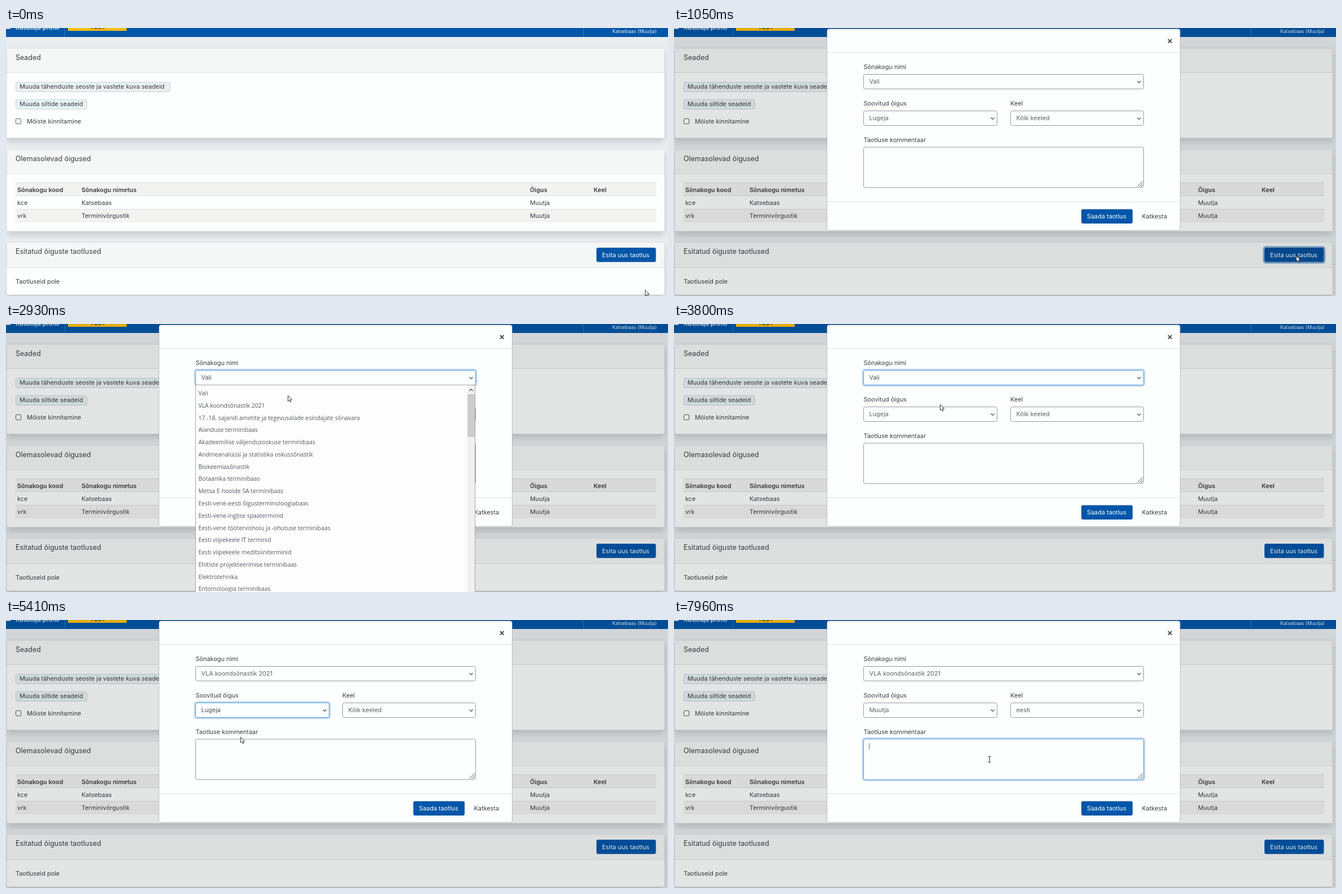
An HTML page with a canvas for the animation above (8000 ms loop, 1175x477 px).

```html
<!DOCTYPE html>
<html lang="et">
<head>
<meta charset="utf-8">
<title>Õiguse taotlemine</title>
<style>
html, body { margin: 0; width: 100%; height: 100%; overflow: hidden; background: #e9edf0; }
canvas { display: block; }
</style>
</head>
<body>
<canvas id="stage" width="1175" height="477"></canvas>
<script>
const ctx = document.getElementById('stage').getContext('2d');
const W = 1175, H = 477, LOOP = 8000;
const UI = 'Inter, sans-serif', MENU = '"Open Sans", sans-serif';
const INK = '#3b3e43', BLUE = '#0056a8', LINE = '#dfe3e5';
const ROW = 21.78;

const DICTS = ['Vali', 'VLA koondsõnastik 2021',
  '17.-18. sajandi ametite ja tegevusalade esindajate sõnavara',
  'Aianduse terminibaas', 'Akadeemilise väljendusoskuse terminibaas',
  'Andmeanalüüsi ja statistika oskussõnastik', 'Biokeemiasõnastik',
  'Botaanika terminibaas', 'Metsa E-hoolde SA terminibaas',
  'Eesti-vene-eesti õigusterminoloogiabaas', 'Eesti-vene-inglise spaaterminid',
  'Eesti-vene töötervishoiu ja -ohutuse terminibaas', 'Eesti viipekeele IT terminid',
  'Eesti viipekeele meditsiiniterminid', 'Ehitiste projekteerimise terminibaas',
  'Elektrotehnika', 'Entomoloogia terminibaas'];
const RIGHTS = ['Lugeja', 'Muutja'];
const LANGS = ['Kõik keeled', 'eesti', 'hollandi', 'hispaania', 'inglise', 'itaalia', 'kreeka',
  'ladina', 'läti', 'poola', 'portugali', 'prantsuse', 'rootsi', 'saksa'];

// Pointer moves: first step, last step, number of steps, end point
const MOVES = [
  [60, 130, 2, 1124, 451], [470, 720, 5, 1104, 405], [1460, 1600, 3, 785, 178],
  [1860, 2130, 5, 563, 98], [2790, 2930, 3, 500, 127], [3000, 3400, 7, 472, 143],
  [3920, 4260, 6, 430, 157], [4650, 4990, 6, 416, 208], [5480, 6080, 10, 638, 164],
  [6610, 6610, 1, 639, 178], [6680, 6820, 3, 641, 205], [7550, 7820, 4, 560, 248]];

function pointer(t) {
  let x = 1134, y = 466;
  for (const [a, b, n, px, py] of MOVES) {
    if (t < a) break;
    const step = b > a ? Math.floor((t - a) / (b - a) * (n - 1) + 1e-6) + 1 : n;
    const f = Math.min(step / n, 1);
    x += (px - x) * f;
    y += (py - y) * f;
  }
  return [x, y];
}

function text(s, x, cy, { size = 10.9, color = INK, weight = 400, font = UI } = {}) {
  ctx.font = `${weight} ${size}px ${font}`;
  ctx.fillStyle = color;
  ctx.fillText(s, x, Math.round(cy + size * 0.36));
}

function rect(x, y, w, h, color) {
  ctx.fillStyle = color;
  ctx.fillRect(x, y, w, h);
}

function box(x, y, w, h, r, fill, stroke) {
  ctx.beginPath();
  ctx.roundRect(x, y, w, h, r);
  if (fill) { ctx.fillStyle = fill; ctx.fill(); }
  if (stroke) { ctx.strokeStyle = stroke; ctx.lineWidth = 1; ctx.stroke(); }
}

function path(points, color, width) {
  ctx.beginPath();
  points.forEach(([x, y]) => ctx.lineTo(x, y));
  ctx.strokeStyle = color;
  ctx.lineWidth = width;
  ctx.stroke();
}

function ring(x, y, w, h, alpha) {
  ctx.beginPath();
  ctx.roundRect(x - 1.5, y - 1.5, w + 3, h + 3, 4);
  ctx.strokeStyle = `rgba(0, 86, 168, ${alpha})`;
  ctx.lineWidth = 2.4;
  ctx.stroke();
}

function chevron(x, y, dir = 1) {
  path([[x - 3, y - 1.6 * dir], [x, y + 1.6 * dir], [x + 3, y - 1.6 * dir]], '#44474c', 1.3);
}

function panel(y, bottom, split, title) {
  ctx.save();
  ctx.shadowColor = 'rgba(0, 0, 0, .15)';
  ctx.shadowBlur = 12;
  ctx.shadowOffsetY = 6;
  box(1, y, 1168, bottom - y, 3, '#fdfefe');
  ctx.restore();
  box(1, y, 1168, split - y, [3, 3, 0, 0], '#f5f7f7');
  rect(1, split, 1168, 1, LINE);
  box(1.5, y + .5, 1167, bottom - y - 1, 3, null, 'rgba(0, 0, 0, .08)');
  text(title, 17, y + 16.8, { size: 12.45 });
}

function page(t) {
  rect(0, 0, W, H, '#e9edf0');
  rect(0, 0, W, 16, BLUE);
  rect(0, 0, 8, 1.5, '#fff');
  text('Kasutaja profiil', 17, -1, { color: '#fff', weight: 500 });
  rect(104, 0, 1, 16, '#3077b9');
  rect(1024, 0, 1, 16, '#3077b9');
  rect(110, 0, 104, 5, '#fdbf0f');
  text('TEST', 149, -1.5, { weight: 600 });
  text('Katsebaas (Muutja)', 1076, 6, { size: 8.6, color: '#e6eef6' });

  panel(36, 196, 79, 'Seaded');
  box(17.5, 96.5, 274, 17, 2.5, '#e9f0f2', '#c9d8dd');
  text('Muuda tähenduste seoste ja vastete kuva seadeid', 24, 104.5);
  box(17.5, 127.5, 126, 17, 2.5, '#e9f0f2', '#c9d8dd');
  text('Muuda siltide seadeid', 24, 135.5);
  box(17.5, 161.5, 9, 9, 1, '#fff', '#55575f');
  text('Mõiste kinnitamine', 37, 166);

  panel(216, 362, 259, 'Olemasolevad õigused');
  rect(17, 275, 1137, 24, '#f2f2f1');
  rect(17, 323, 1137, 23, '#f2f2f1');
  [275, 298, 322].forEach(y => rect(17, y, 1137, 1, '#dbdfe2'));
  const cols = [20, 134, 930, 1043];
  [['Sõnakogu kood', 'Sõnakogu nimetus', 'Õigus', 'Keel'],
   ['kce', 'Katsebaas', 'Muutja'],
   ['vrk', 'Terminivõrgustik', 'Muutja']].forEach((row, i) =>
    row.forEach((s, j) => text(s, cols[j], 287.8 + i * 23.3, { weight: i ? 400 : 600 })));

  panel(381, 475, 426, 'Esitatud õiguste taotlused');
  text('Taotluseid pole', 17, 451);
  const hover = t >= 720 && t < 1530, focus = t >= 990 && t < 2390;
  box(1048, 391, 105.5, 25.5, 3, hover ? '#004f9b' : BLUE);
  if (focus) ring(1048, 391, 105.5, 25.5, .5);
  text('Esita uus taotlus', 1058, 404, { color: '#fff' });
}

function field(x, y, w, h, focus, value) {
  if (focus) ring(x, y, w, h, .26);
  box(x, y, w, h, 3, '#fdfefe', focus ? '#52a6ee' : '#949ba5');
  if (value) {
    text(value, x + 10, y + 13, { color: focus ? '#495057' : '#5d646d' });
    chevron(x + w - 8, y + 13.5);
  }
}

function menu(x, y, w, h, items, active, thumb) {
  rect(x, y, w, h, '#fdfdfe');
  ctx.strokeStyle = '#a3a6ad';
  ctx.lineWidth = 1;
  ctx.strokeRect(x + .5, y + .5, w - 1, h);
  const inner = thumb ? w - 14 : w - 2;
  items.forEach((s, i) => {
    const top = Math.round(y + 3.6 + i * ROW);
    if (i === active) rect(x + 1, top, inner - 1, 22, '#e0dfe6');
    text(s, x + 5.5, y + 15.2 + i * ROW,
      { size: 10.4, font: MENU, color: i === active ? '#28223c' : '#555963' });
  });
  if (thumb) {
    rect(x + inner, y + 1, 13, h, '#f0f0f1');
    rect(x + inner, y + 17, 13, thumb, '#cccccd');
    chevron(x + inner + 6.5, y + 9.5, -1);
  }
}

function modal(t, py) {
  box(271.5, 1.5, 627, 359, 4, '#fdfefe', 'rgba(0, 0, 0, .2)');
  rect(272, 43, 626, 1, LINE);
  rect(272, 309, 626, 1, LINE);
  path([[877, 20], [883.5, 26.5]], '#515357', 2);
  path([[883.5, 20], [877, 26.5]], '#515357', 2);

  text('Sõnakogu nimi', 336.5, 69.5);
  text('Soovitud õigus', 336.5, 134.5);
  text('Keel', 597, 134.5);
  text('Taotluse kommentaar', 336.5, 199);

  field(336.5, 82.5, 497, 26, t >= 2390 && t < 4390, DICTS[+(t >= 3920)]);
  field(336.5, 147.5, 237, 26, t >= 4390 && t < 6150, RIGHTS[+(t >= 5480)]);
  field(597.5, 147.5, 236, 26, t >= 6150 && t < 7890, LANGS[+(t >= 7350)]);
  field(336.5, 212, 497, 72, t >= 7890);
  [10, 6, 3].forEach(d => path([[832 - d, 282.5], [832, 282.5 - d]], '#55585d', 1));
  if (t >= 7960) rect(346, 219, 1, 12, '#73787f');

  box(723, 322.5, 91, 25.5, 3, BLUE);
  text('Saada taotlus', 733, 335.5, { color: '#fff' });
  text('Katkesta', 830.5, 335.5);

  if (t >= 2460 && t < 3730) menu(336, 108, 497, 380, DICTS, py > 134 ? 1 : -1, 76);
  if (t >= 4460 && t < 5340) menu(336, 173, 238, 51, RIGHTS, +(py > 199));
  if (t >= 6290 && t < 7280) menu(597, 173, 236, 320, LANGS, +(py > 199), 13);
}

function cursor(x, y, beam) {
  if (beam) {
    const dark = '#3c3f44';
    path([[x, y - 5], [x, y + 5]], dark, 1.2);
    [-5, 5].forEach(d => path([[x - 2.5, y + d], [x + 2.5, y + d]], dark, 1.1));
    return;
  }
  ctx.beginPath();
  [[0, 0], [0, 10], [2.3, 8], [4, 11.6], [5.6, 10.8], [4, 7.4], [7.2, 7.2]]
    .forEach(([dx, dy]) => ctx.lineTo(x + .5 + dx, y + .5 + dy));
  ctx.closePath();
  ctx.fillStyle = '#fff';
  ctx.fill();
  ctx.strokeStyle = '#22242c';
  ctx.lineWidth = .9;
  ctx.stroke();
}

function draw(now) {
  const t = now % LOOP;
  const [x, y] = pointer(t);
  page(t);
  if (t >= 990) rect(0, 0, W, H, `rgba(0, 0, 0, ${t < 1050 ? .05 : .1})`);
  if (t >= 1050) modal(t, y);
  cursor(x, y, t >= 7550 && y > 212);
  requestAnimationFrame(draw);
}
requestAnimationFrame(draw);
</script>
</body>
</html>
```
